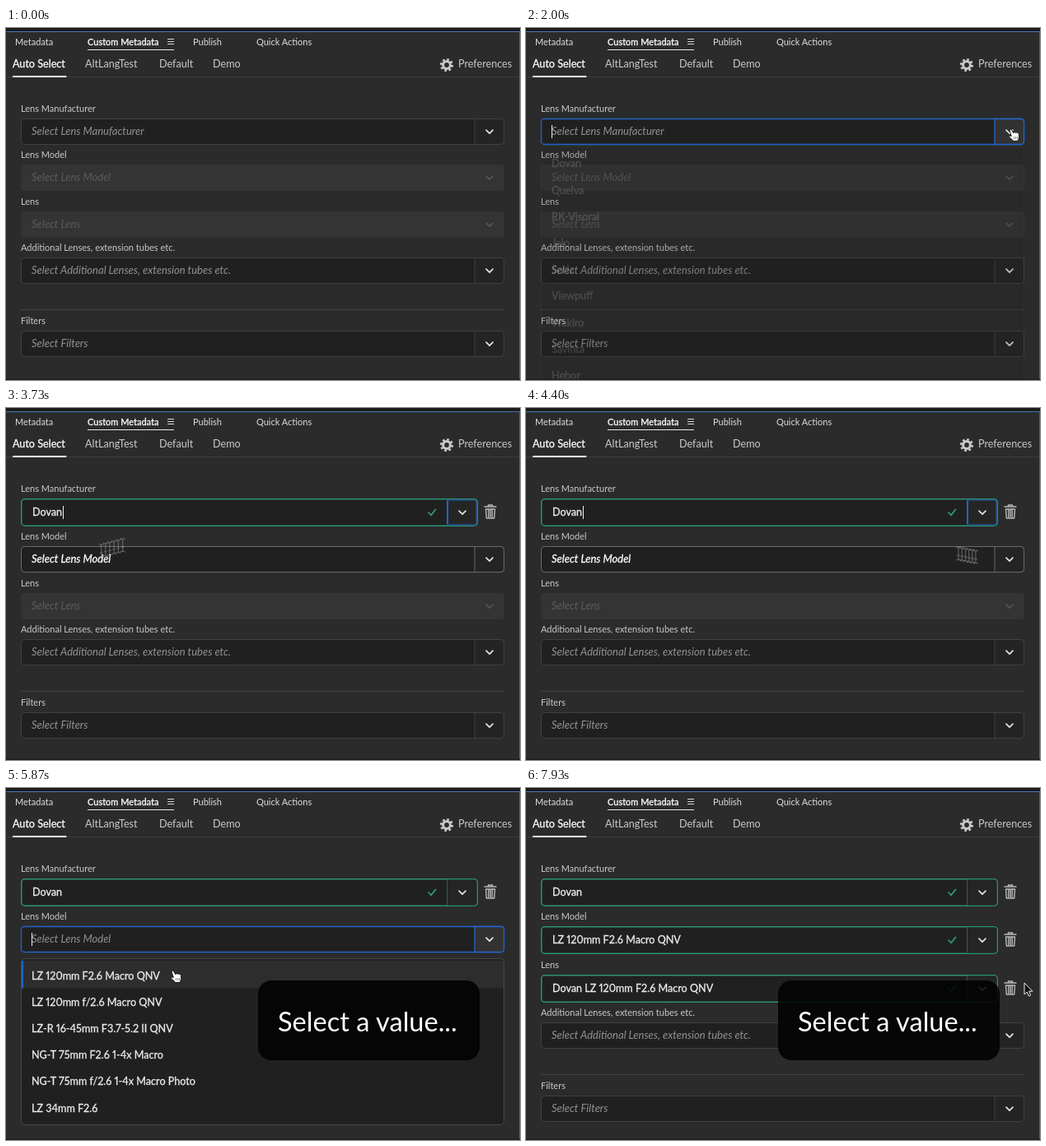
Write an HTML page that moves like this. It is 624x428 px and loops after 8000 ms.

```html
<!DOCTYPE html>
<html lang="en">
<head>
<meta charset="utf-8">
<title>Lens metadata form</title>
<style>
html, body { margin: 0; width: 100%; height: 100%; overflow: hidden; background: #2b2b2b; }
svg { display: block; }
text { font: 11px Lato, sans-serif; fill: #c9c9c9; font-variant-numeric: proportional-nums; }
.panel { fill: #dcdcdc; }
.tab { font-size: 12.6px; }
.on { fill: #fff; stroke: #fff; stroke-width: .3px; }
.hint { font-size: 13px; font-style: italic; fill: #929292; }
.hover { fill: #fff; stroke: #fff; stroke-width: .3px; }
.off { fill: #5b5b5b; }
.value { font-size: 12.6px; fill: #ececec; stroke: #ececec; stroke-width: .3px; }
.callout { font-size: 32.6px; fill: #fff; }
</style>
</head>
<body>
<svg id="stage" width="624" height="428" viewBox="0 0 624 428"></svg>
<script>
const stage = document.getElementById('stage');
const LOOP = 8000, TICK = 1000 / 15;
const BLUE = '#2364c8', GREEN = '#2a9472';
const MODEL = 'LZ 120mm F2.6 Macro QNV';

// filled: tick at which the field gets its value; needs: tick at which it is enabled
const fields = [
  { label: 'Lens Manufacturer', top: 110, filled: 50, value: 'Dovan' },
  { label: 'Lens Model', top: 166, filled: 97, value: MODEL, needs: 50 },
  { label: 'Lens', top: 223, filled: 117, value: 'Dovan ' + MODEL, needs: 97 },
  { label: 'Additional Lenses, extension tubes etc.', top: 279 },
  { label: 'Filters', top: 368 },
];
const menus = [
  { top: 149, bottom: 450, opens: 29.5, closes: 48.5,
    items: ['Dovan', 'Quelva', 'RK-Visoral', 'Jelo', 'Sorla', 'Viewpuff', 'Wakiro', 'Savinta', 'Hebor'] },
  { top: 207, bottom: 409, opens: 72.4, closes: 95.5,
    items: [MODEL, 'LZ 120mm f/2.6 Macro QNV', 'LZ-R 16-45mm F3.7-5.2 II QNV',
      'NG-T 75mm F2.6 1-4x Macro', 'NG-T 75mm f/2.6 1-4x Macro Photo', 'LZ 34mm F2.6'] },
];
// pointer legs: start tick, end tick, quadratic curve points
const legs = [
  [12, 20, [400, 126], [500, 126], [592, 130]],
  [35, 47, [592, 130], [330, 190], [102, 177]],
  [55, 68, [102, 178], [282, 118], [590, 191]],
  [77, 87, [590, 191], [400, 215], [206, 229]],
  [101, 113, [206, 229], [420, 232], [605, 237]],
];

const clamp = v => Math.min(1, Math.max(0, v));
const smooth = v => (v = clamp(v), v * v * (3 - 2 * v));
const text = (x, y, s, cls = '') => `<text x="${x}" y="${y}" class="${cls}">${s}</text>`;
const rect = (x, y, w, h, fill, stroke = 'none', r = 0, sw = 1) =>
  `<rect x="${x}" y="${y}" width="${w}" height="${h}" rx="${r}" fill="${fill}" stroke="${stroke}" stroke-width="${sw}"/>`;
const line = (d, color, w = 1) =>
  `<path d="${d}" fill="none" stroke="${color}" stroke-width="${w}" stroke-linecap="round" stroke-linejoin="round"/>`;
const chevron = (x, y, color) => line(`M${x - 4} ${y - 1.8}l4 4 4-4`, color, 1.8);
const caret = (x, y) => rect(x, y - 8, 1, 16, '#eee');

function pointer(k) {
  const leg = legs.findLast(l => l[0] <= k) || legs[0];
  const [start, end, a, b, c] = leg;
  const p = 1 - (1 - clamp((k - start) / (end - start))) ** 1.4, q = 1 - p;
  return [0, 1].map(i => q * q * a[i] + 2 * q * p * b[i] + p * p * c[i]);
}

const shapes = {
  hand: '<path d="M-5-5.8q1-1.8 2.6-.4l2 3.8 1.2-.7q1-.5 1.7.3 1.1-.7 1.9.3 1.5-.3 1.9 1l.3 4-1 4.5-5.6.6-5.6-5.4q-.2-1.5 1.6-1.2l1.3.6z" fill="#fff" stroke="#111" stroke-width=".9"/><path d="M.5 2v3m2-3v3m2-3v3" stroke="#555" stroke-width=".7"/>',
  beam: '<path d="M-3-8q3 0 3 2.5V6q0 2-3 2M3-8q-3 0-3 2.5V6q0 2 3 2M-2 2.5h4" fill="none" stroke="#ddd" stroke-width="1.3"/>',
  arrow: '<path d="M0 0v14l3.2-3 2.2 5 2.3-1-2.2-4.8H10z" fill="#111" stroke="#eee"/>',
};
const place = (shape, [x, y], alpha = 1) =>
  `<g transform="translate(${x} ${y})" opacity="${alpha}">${shapes[shape]}</g>`;

function cursor(k) {
  if (k < 13) return '';
  const now = pointer(k), before = pointer(k - 1);
  const open = menus.some(m => k > m.opens && k < m.closes);
  const shape = k >= 108 ? 'arrow' : k === 48 ? 'beam' : open || now[0] > 569 ? 'hand' : 'beam';
  if (Math.hypot(now[0] - before[0], now[1] - before[1]) > 1) {
    return [.35, .48, .61, .74, .87, 1].map(f => place(shape, pointer(k - 1 + f), .32)).join('');
  }
  const ghost = k === 48 ? place('hand', [now[0] + 2, now[1] + 6], .5) : '';
  return ghost + place(shape, now);
}

function trash(x, y) {
  return line(`M${x - 7} ${y - 6}h14M${x - 2.5} ${y - 6}v-2h5v2`, '#b9b9b9', 1.5) +
    line(`M${x - 5.5} ${y - 3}l.8 11h9.4l.8-11zm3.3 1v8.5m2.2-8.5v8.5m2.2-8.5v8.5`, '#b9b9b9', 1.4);
}

function field(f, i, k, shift, focus) {
  const y = f.top + shift, [px, py] = pointer(k);
  const focused = focus.index === i, blink = Math.floor((k - focus.since) / 8) % 2 === 0;
  const covered = menus.some(m => k > m.opens && k < m.closes);
  const hover = k >= 13 && !covered && !focused && px < 569 && py > y - 2 && py < y + 32;
  let out = text(18, y - 8.5, f.label);
  if (k >= f.filled) {
    const mid = y + 17;
    out += rect(18.75, y + .75, 553.5, 32.5, '#202020', GREEN, 4, 1.5) +
      rect(536, y + 1.5, 35.5, 31, '#252525', 'none', 3) +
      line(`M535.5 ${y + 2}v30`, focused ? BLUE : '#39584e') +
      text(32, mid + 4, f.value, 'value') +
      line(`M513 ${mid}l3 3.4 5.5-7`, GREEN, 1.8) +
      chevron(554, mid, '#ddd') + trash(588, mid - 1);
    if (focused) {
      out += rect(536.5, y + 2, 34.5, 30, 'none', BLUE, 2);
      if (blink) out += caret(i ? 189 : 69, mid);
    }
    return out;
  }
  const mid = y + 16;
  if (k < f.needs) {
    return out + rect(18, y, 587, 32, '#343434', 'none', 4) +
      text(31, mid + 4, 'Select ' + f.label, 'hint off') + chevron(587, mid, '#555');
  }
  const edge = focused ? BLUE : hover ? '#6a6a6a' : '#414141';
  const w = focused ? 1.3 : 1;
  out += rect(18.5, y + .5, 586, 31, '#202020', edge, 4, w) +
    `<path d="M569 ${y + .5}h32q3.5 0 3.5 4v23q0 4-3.5 4h-32z" fill="${focused ? '#323232' : '#242424'}" stroke="${edge}" stroke-width="${w}"/>` +
    text(31, mid + 4, 'Select ' + f.label, hover ? 'hint hover' : 'hint') +
    chevron(587, mid, '#e0e0e0');
  if (focused && blink) out += caret(31, mid);
  return out;
}

function menu(m, k) {
  const alpha = smooth((k - m.opens) / 1.95) - smooth((k - m.closes) / 1.95);
  if (alpha <= 0) return '';
  const [px, py] = pointer(k);
  const row = Math.floor((py - m.top - 3) / 32.2);
  let out = rect(18.5, m.top + .5, 586, m.bottom - m.top, '#202020', '#494949', 4);
  if (row >= 0 && px < 600 && k > m.opens + 2) {
    const y = m.top + 3 + row * 32.2;
    out += rect(19, y, 585, 33.5, '#2d2d2d') + rect(19, y, 2, 33.5, BLUE);
  }
  m.items.forEach((s, i) => out += text(31, m.top + 25.5 + i * 32.2, s, 'value'));
  return `<g opacity="${alpha}" transform="translate(0 ${-6 * (1 - alpha)})">${out}</g>`;
}

const header =
  rect(0, 0, 624, 428, '#2b2b2b') + rect(0, 0, 624, 4, '#1c1c1c') +
  rect(0, 4, 624, 1, '#4675b8') + rect(623, 4, 1, 424, '#35629c') +
  rect(0, 59, 623, 1, '#3d3d3d') +
  text(11, 21, 'Metadata', 'panel') + text(99, 21, 'Custom Metadata', 'on') +
  text(227, 21, 'Publish', 'panel') + text(304, 21, 'Quick Actions', 'panel') +
  line('M196.5 13.5h7m-7 3h7m-7 3h7', '#ddd') + rect(99, 26, 105, 1, '#e8e8e8') +
  text(8, 48, 'Auto Select', 'tab on') + text(96, 48, 'AltLangTest', 'tab') +
  text(186, 48, 'Default', 'tab') + text(251, 48, 'Demo', 'tab') +
  text(549, 48, 'Preferences', 'tab') + rect(8, 58, 65.5, 2, '#fff', 'none', 1) +
  `<g fill="none" stroke="#c9c9c9"><circle cx="535" cy="45" r="4.4" stroke-width="3"/>
   <circle cx="535" cy="45" r="6.7" stroke-width="2.8" stroke-dasharray="2.63"/></g>`;

function callout(k) {
  const alpha = smooth((k - 79) / 7);
  return `<g opacity="${alpha}">${rect(306, 234, 269, 97, 'rgba(0,0,0,.86)', 'none', 16)}${text(330, 296, 'Select a value...', 'callout')}</g>`;
}

function draw(k) {
  const focus = k < 29 || k >= 115 ? { index: -1, since: 0 }
    : k < 72 ? { index: 0, since: k < 49 ? 29 : 49 }
    : { index: 1, since: k < 96 ? 72 : 96 };
  let shift = 0, form = '';
  fields.forEach((f, i) => {
    form += field(f, i, k, shift, focus);
    if (k >= f.filled) shift += 2;
  });
  form += rect(18, 342 + shift, 587, 1, '#414141');
  stage.innerHTML = header + form + menus.map(m => menu(m, k)).join('') +
    rect(0, 426.5, 624, 1.5, '#1e1e1e') + cursor(k) + callout(k);
}

let shown = -1;
function frame() {
  const k = Math.floor((performance.now() % LOOP + 4) / TICK) % 120;
  if (k !== shown) draw(shown = k);
  requestAnimationFrame(frame);
}
frame();
</script>
</body>
</html>
```
